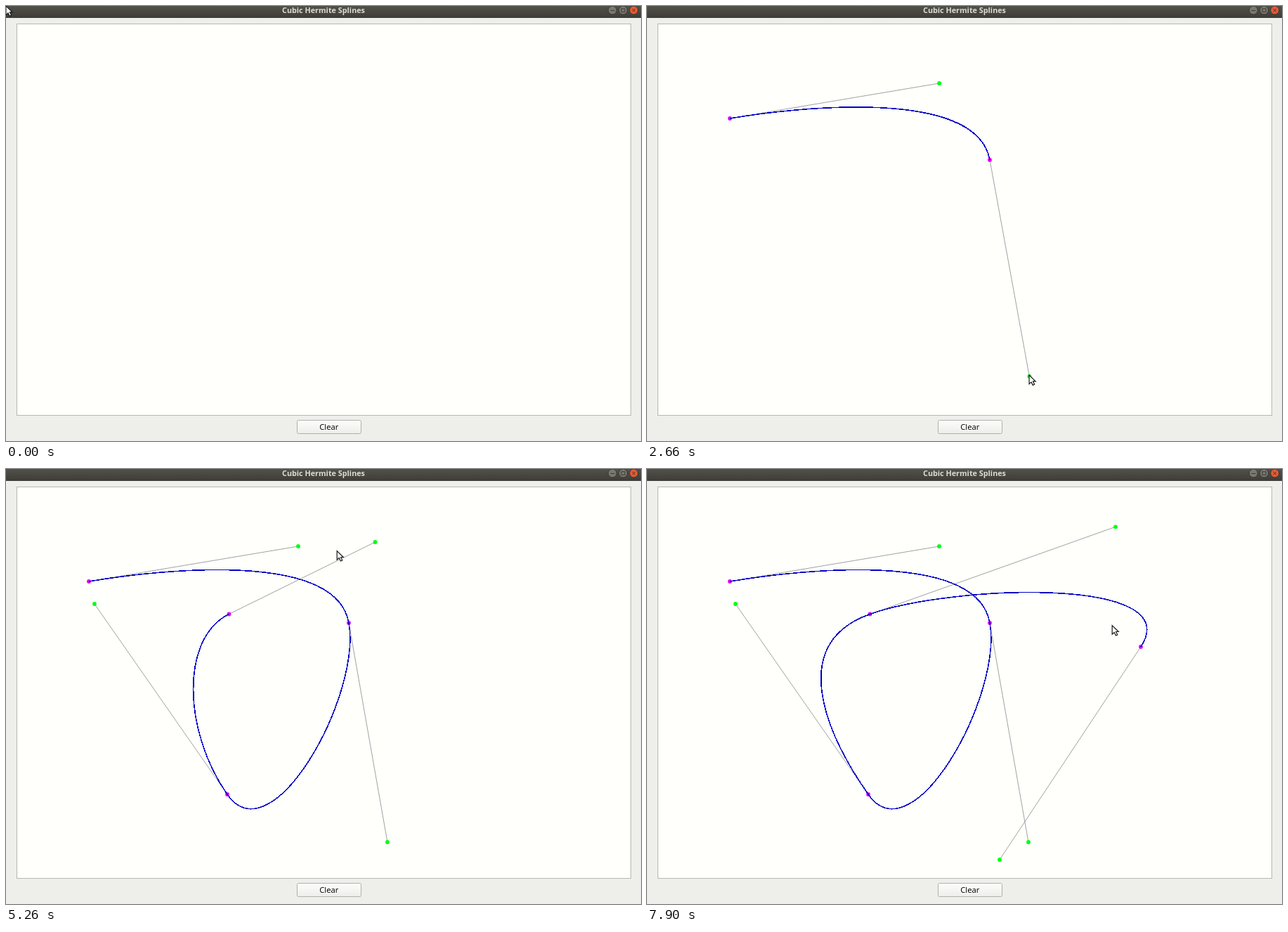
These frames come from a looping animation (904x619 px, 8000 ms). An HTML page:

```html
<!DOCTYPE html>
<html lang="en">
<head>
<meta charset="utf-8">
<title>Cubic Hermite Splines</title>
<style>
  html, body { margin: 0; width: 100%; height: 100%; overflow: hidden; background: #eeeeea; }
  svg { display: block; width: 904px; height: 619px; }
  text { font-family: "Open Sans", "Noto Sans", sans-serif; text-anchor: middle; }
  .title { font-size: 10.8px; font-weight: 700; fill: #dfdbd2; }
  .label { font-size: 11.2px; font-weight: 500; fill: #000; }
  .curve { fill: none; stroke: #0000c4; stroke-width: 1.6; shape-rendering: crispEdges; }
  .arm { fill: none; stroke: #a0a0a2; stroke-width: 1; }
  .knot { fill: #e400fa; }
  .grip { fill: #00ff14; }
</style>
</head>
<body>
<svg viewBox="0 0 904 619">
  <defs>
    <linearGradient id="bar" x2="0" y2="1">
      <stop stop-color="#52514a"/><stop offset="1" stop-color="#3d3c37"/>
    </linearGradient>
    <linearGradient id="face" x2="0" y2="1">
      <stop stop-color="#fdfdfc"/><stop offset="1" stop-color="#ededea"/>
    </linearGradient>
  </defs>
  <rect width="904" height="619" fill="#eeeeea"/>
  <rect width="904" height="17" fill="url(#bar)"/>
  <text class="title" x="452" y="10">Cubic Hermite Splines</text>
  <g stroke="#3a3934" stroke-width="1">
    <circle cx="863.3" cy="6" r="6" fill="#7b786e"/>
    <circle cx="878.5" cy="6" r="6" fill="#7b786e"/>
    <circle cx="893.7" cy="6" r="6" fill="#e75a34"/>
    <path d="M860.5 6.5h6M876 3.8h5v4.7h-5zM891.6 4l4.2 4.2M895.8 4l-4.2 4.2" fill="none"/>
  </g>
  <rect x="15.5" y="25.5" width="874" height="557" fill="#fffffc" stroke="#b7b7b2"/>
  <rect x="414.5" y="589.5" width="91" height="19" rx="2" fill="url(#face)" stroke="#b2b0aa"/>
  <text class="label" x="459.8" y="603">Clear</text>

  <path id="arms" class="arm"/>
  <g id="dots"></g>
  <path id="curve" class="curve"/>
  <path id="cursor" d="M0 0V12.6L3 9.9L5.2 14.4L7.6 13.3L5.4 8.9H9.1Z" fill="#fff" stroke="#1a1a1a" stroke-width="1.2"/>
</svg>
<script>
const LOOP = 8000, STEP = 20, TICK = 100;
const $ = id => document.getElementById(id);
const easeOut = u => 1 - (1 - u) ** 3;

// The hand goes from leg to leg: [arrival ms, x, y]. Each move starts where the last one ended.
const hop = (at, ...legs) => ({ at, legs });
const drag = (at, ...legs) => ({ at, legs, pulls: true });
const moves = [
  hop(0, [0, 273.6, 349.8], [80, 272, 348]),
  hop(200, [600, 118, 160]),
  drag(980, [1300, 416, 110]),
  hop(1520, [1720, 488, 219]),
  drag(2040, [2340, 572, 447], [2840, 543, 531]),
  hop(2980, [3380, 315, 463]),
  drag(3594, [4160, 119, 222], [4280, 126, 192]),
  hop(4400, [4800, 317.5, 206.5]),
  drag(5100, [5240, 472, 117], [5260, 525.5, 104], [5320, 525.5, 104], [5640, 667, 82.3]),
  hop(5740, [5940, 703, 253]),
  drag(6240, [6440, 656, 543], [6640, 615, 600], [6940, 502, 556]),
  hop(7200, [7680, 660, 190], [7900, 663, 223])
];

// Link the moves: each one knows its starting point and its end
let home = moves[0].legs[0].slice(1);
for (const m of moves) {
  m.from = home;
  m.end = m.legs.at(-1)[0];
  home = m.legs.at(-1).slice(1);
}

function along(m, t) {
  let since = m.at, from = m.from;
  for (const [end, ...to] of m.legs) {
    if (t < end) {
      const u = easeOut(Math.max(0, t - since) / (end - since));
      return from.map((c, k) => c + (to[k] - c) * u);
    }
    since = end;
    from = to;
  }
  return from;
}

// The pointer is redrawn once per tick, the last tick falling on the end of the move
function pointer(t) {
  const m = moves.findLast(m => m.at <= t);
  const ticks = Math.ceil(Math.max(0, m.end - t) / TICK);
  return along(m, m.end - ticks * TICK);
}

const dot = (kind, p) => `<circle class="${kind}" cx="${p[0]}" cy="${p[1]}" r="2.9"/>`;

function draw(t) {
  const nodes = moves.filter(m => m.pulls && m.at <= t)
    .map(m => ({ p: m.from, g: along(m, t) }));
  const third = (n, sign) => n.p.map((c, k) => c + sign * (n.g[k] - c) / 3);

  $("arms").setAttribute("d", nodes.map(n => `M${n.p}L${n.g}`).join(""));
  $("dots").innerHTML = nodes.map(n => dot("knot", n.p) + dot("grip", n.g)).join("");
  // Hermite segments written as Bezier curves
  $("curve").setAttribute("d", nodes.map((n, i) => i
    ? `C${third(nodes[i - 1], 1)} ${third(n, -1)} ${n.p}` : `M${n.p}`).join(""));
  const [x, y] = pointer(t);
  $("cursor").setAttribute("transform", `translate(${x - 0.8} ${y - 0.4})`);
}

const start = performance.now();
function frame() {
  const t = (performance.now() - start) % LOOP;
  draw(Math.floor(t / STEP) * STEP);
  requestAnimationFrame(frame);
}
frame();
</script>
</body>
</html>
```
